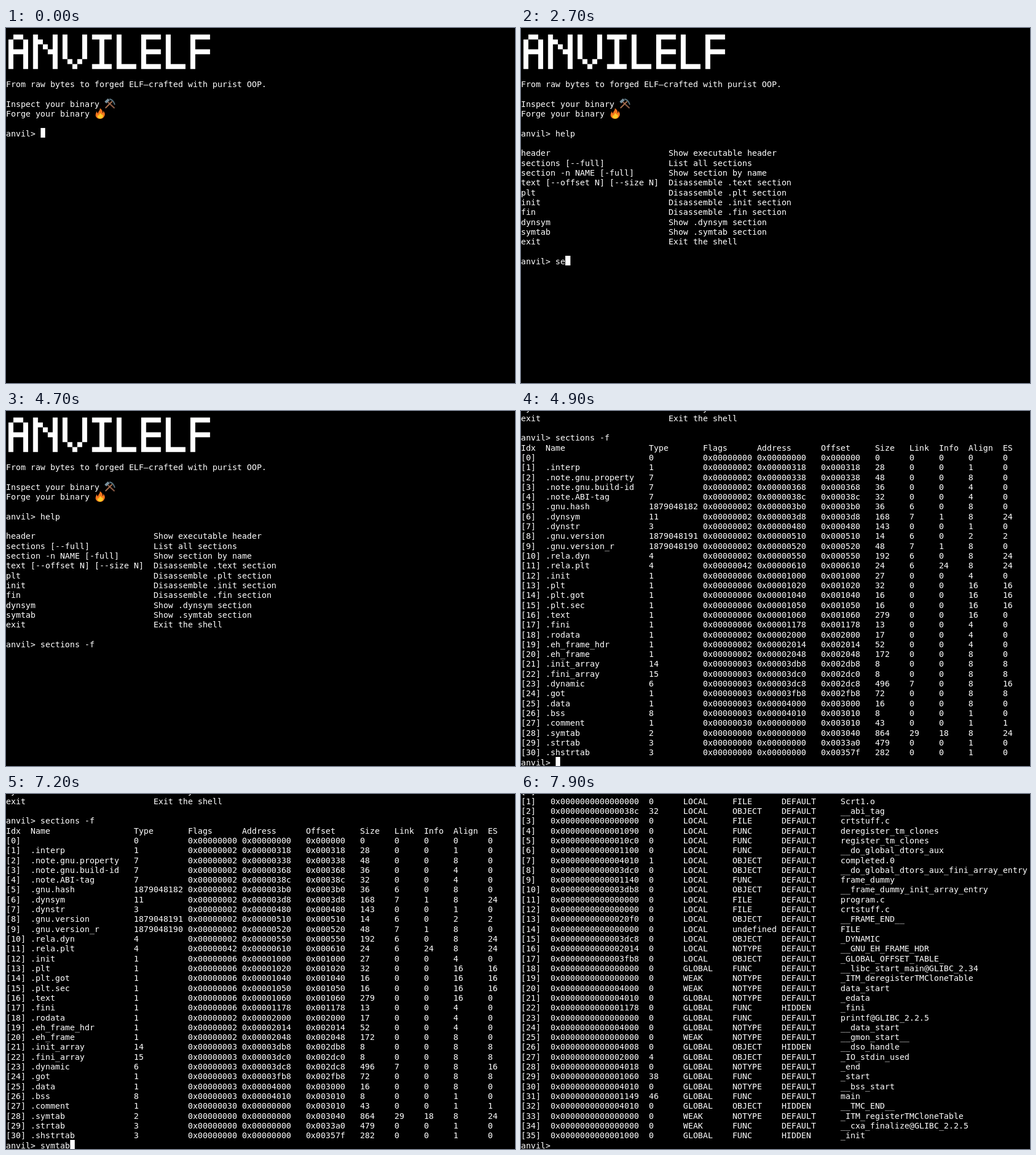
These frames come from a looping animation (896 by 625 pixels, 8000 ms). An HTML page with a canvas:

```html
<!DOCTYPE html>
<html lang="en">
<meta charset="utf-8">
<title>anvil shell</title>
<style>
  html, body { margin: 0; height: 100%; overflow: hidden; background: #000; }
  canvas { display: block; }
</style>
<canvas id="stage" width="896" height="625"></canvas>
<script>
const ctx = document.getElementById('stage').getContext('2d');
const LOOP = 8000, CELL = 8.655, LINE = 2 * CELL, TOP = 2.9, BASELINE = 14.8, ROWS = 36;
const PROMPT = 'anvil> ', IDLE = 500;

// Lay cells out at fixed text columns.
const layout = (columns, cells) =>
  cells.reduce((line, cell, i) => line.padEnd(columns[i]) + cell, '');
const parse = list => list.trimEnd().split(/,\s+/).map(row => row.split(' '));
const hex = (value, width) => '0x' + value.toString(16).padStart(width, '0');

const intro = ['', '', '', '', '',
  'From raw bytes to forged ELF—crafted with purist OOP.', '',
  'Inspect your binary', 'Forge your binary', ''];

const help = ['', ...[
  ['header', 'Show executable header'],
  ['sections [--full]', 'List all sections'],
  ['section -n NAME [-full]', 'Show section by name'],
  ['text [--offset N] [--size N]', 'Disassemble .text section'],
  ['plt', 'Disassemble .plt section'],
  ['init', 'Disassemble .init section'],
  ['fin', 'Disassemble .fin section'],
  ['dynsym', 'Show .dynsym section'],
  ['symtab', 'Show .symtab section'],
  ['exit', 'Exit the shell'],
].map(row => layout([0, 30], row)), ''];

// ELF section kinds: type, alignment, entry size, linked section
const kinds = {
  null: [0, 0, 0],
  bytes: [1, 1, 0], chars: [1, 1, 1], words: [1, 4, 0], longs: [1, 8, 0],
  code: [1, 16, 0], plt: [1, 16, 16], got: [1, 8, 8],
  symtab: [2, 8, 24, '.strtab'], strtab: [3, 1, 0], rela: [4, 8, 24, '.dynsym'],
  dynamic: [6, 8, 16, '.dynstr'], property: [7, 8, 0], note: [7, 4, 0], bss: [8, 1, 0],
  dynsym: [11, 8, 24, '.dynstr'], init: [14, 8, 8], fini: [15, 8, 8],
  hash: [0x6ffffff6, 8, 0, '.dynsym'], verneed: [0x6ffffffe, 8, 0, '.dynstr'],
  versym: [0x6fffffff, 2, 2, '.dynsym'],
};

// Segments: flags, start offset, then sections as name, size, kind, info
const segments = [
  [0, 0, ' 0 null'],
  [2, 0x318, `.interp 28 bytes, .note.gnu.property 48 property, .note.gnu.build-id 36 note,
    .note.ABI-tag 32 note, .gnu.hash 36 hash, .dynsym 168 dynsym 1, .dynstr 143 strtab,
    .gnu.version 14 versym, .gnu.version_r 48 verneed 1, .rela.dyn 192 rela, .rela.plt 24 rela .got`],
  [6, 0x1000, `.init 27 words, .plt 32 plt, .plt.got 16 plt, .plt.sec 16 plt, .text 279 code,
    .fini 13 words`],
  [2, 0x2000, '.rodata 17 words, .eh_frame_hdr 52 words, .eh_frame 172 longs'],
  [3, 0x2db8, `.init_array 8 init, .fini_array 8 fini, .dynamic 496 dynamic, .got 72 got,
    .data 16 longs, .bss 8 bss`],
  [0x30, 0x3010, '.comment 43 chars'],
  [0, 0x303b, '.symtab 864 symtab 18, .strtab 479 strtab, .shstrtab 282 strtab'],
];

const ALLOCATED = 2, WRITABLE = 1, INFO_LINK = 0x40;
const placed = segments.flatMap(([flags, start, list]) => {
  let end = start;
  return parse(list).map(([name, size, kind, info = '0']) => {
    const align = kinds[kind][1] || 1;
    const offset = Math.ceil(end / align) * align;
    if (kind !== 'bss') end = offset + Number(size);
    const address = flags & ALLOCATED ? offset + (flags & WRITABLE ? 0x1000 : 0) : 0;
    return { name, size, kind, info, offset, address,
      flags: info[0] === '.' ? flags | INFO_LINK : flags };
  });
});
const indexOf = name => placed.findIndex(section => section.name === name);

const sectionColumns = [0, 5, 26, 37, 48, 61, 72, 79, 85, 91, 98];
const sections = [
  ['Idx', 'Name', 'Type', 'Flags', 'Address', 'Offset', 'Size', 'Link', 'Info', 'Align', 'ES'],
  ...placed.map(({ name, size, kind, info, offset, address, flags }, i) => {
    const [type, align, entry, link = ''] = kinds[kind];
    return [`[${i}]`, name, type, hex(flags, 8), hex(address, 8), hex(offset, 6), size,
      indexOf(link), info[0] === '.' ? indexOf(info) : info, align, entry];
  }),
].map(cells => layout(sectionColumns, cells));

// Symbols: name, type, place as section+offset, size
const symbolList = parse(` NOTYPE, Scrt1.o FILE, __abi_tag OBJECT .note.ABI-tag 32, crtstuff.c FILE,
  deregister_tm_clones FUNC .text+30, register_tm_clones FUNC .text+60,
  __do_global_dtors_aux FUNC .text+a0, completed.0 OBJECT .bss 1,
  __do_global_dtors_aux_fini_array_entry OBJECT .fini_array, frame_dummy FUNC .text+e0,
  __frame_dummy_init_array_entry OBJECT .init_array, program.c FILE, crtstuff.c FILE,
  __FRAME_END__ OBJECT .eh_frame+a8,  FILE, _DYNAMIC OBJECT .dynamic,
  __GNU_EH_FRAME_HDR NOTYPE .eh_frame_hdr, _GLOBAL_OFFSET_TABLE_ OBJECT .got,
  __libc_start_main@GLIBC_2.34 FUNC, _ITM_deregisterTMCloneTable NOTYPE, data_start NOTYPE .data,
  _edata NOTYPE .bss, _fini FUNC .fini, printf@GLIBC_2.2.5 FUNC, __data_start NOTYPE .data,
  __gmon_start__ NOTYPE, __dso_handle OBJECT .data+8, _IO_stdin_used OBJECT .rodata 4,
  _end NOTYPE .bss+8, _start FUNC .text 38, __bss_start NOTYPE .bss, main FUNC .text+e9 46,
  __TMC_END__ OBJECT .bss, _ITM_registerTMCloneTable NOTYPE, __cxa_finalize@GLIBC_2.2.5 FUNC,
  _init FUNC .init`);
const WEAK = /^(_ITM_|data_start|__gmon|__cxa)/;
const HIDDEN = /^(_init|_fini|__dso_handle|__TMC_END__)$/;
const lastLocal = symbolList.findIndex(([name]) => name === '_GLOBAL_OFFSET_TABLE_');

const symbols = symbolList.map(([name, type, place = '', size = '0'], i) => {
  const [section, shift = '0'] = place.split('+');
  const value = placed[indexOf(section)].address + parseInt(shift, 16);
  const binding = i <= lastLocal ? 'LOCAL' : WEAK.test(name) ? 'WEAK' : 'GLOBAL';
  return layout([0, 6, 26, 33, 43, 53, 65], [`[${i}]`, hex(value, 16), size, binding, type,
    HIDDEN.test(name) ? 'HIDDEN' : 'DEFAULT', name]);
});

// Key times type one character each; other key presses only wake the cursor.
const sessions = [
  { output: intro, shown: -300, command: 'help', keys: [900, 1100, 1200, 1400], wakes: [1800] },
  { output: help, shown: 2000, command: 'sections -f', wakes: [],
    keys: [2600, 2700, 2900, 3100, 3100, 3400, 3600, 3700, 3800, 4100, 4200] },
  { output: sections, shown: 4900, command: 'symtab', wakes: [5700, 7200],
    keys: [5800, 6000, 6100, 6300, 6300, 6500] },
  { output: symbols, shown: 7400, command: '', keys: [], wakes: [] },
];
let log = [];
for (const session of sessions) {
  session.lines = [...log, ...session.output];
  log = [...session.lines, PROMPT + session.command];
}

// Banner letters as strokes one unit wide
const glyphs = {
  A: 'M1 .5h2M.5 1v6M3.5 1v6M1 3.5h2',
  N: 'M.5 0v7M4.5 0v7M1 1.5h1M2 2.5h1M3 3.5h1',
  V: 'M.5 0v5M4.5 0v5M1 5.5h1M2 6.5h1M3 5.5h1',
  I: 'M0 .5h4M2 .5v6M0 6.5h4',
  L: 'M.5 0v6.5h3.5',
  E: 'M4 .5H.5v6H4M.5 3.5H4',
  F: 'M4 .5H.5V7M.5 3.5H4',
};

function stroke(color, width, path) {
  ctx.strokeStyle = color;
  ctx.lineWidth = width;
  ctx.stroke(new Path2D(path));
}

function fill(color, path) {
  ctx.fillStyle = color;
  ctx.fill(new Path2D(path));
}

function at(x, y, paint) {
  ctx.save();
  ctx.translate(x, y);
  paint();
  ctx.restore();
}

function paintBanner() {
  ctx.scale(CELL, CELL);
  for (const letter of 'ANVILELF') {
    stroke('#fff', 1, glyphs[letter]);
    ctx.translate('NV'.includes(letter) ? 6 : 5, 0);
  }
}

function paintTools() {
  stroke('#8a5a44', 2.2, 'M-5 -4L8 8');
  stroke('#a8704f', 2.2, 'M4 -4L-8 8');
  stroke('#546e7a', 2.2, 'M-1 -8Q6 -7 8.5 2');
  stroke('#78909c', 4.4, 'M-8 -2L-2 -7.5');
}

function paintFire() {
  fill('#f4731c', 'M-1 -9C4 -7 4 -3 4 -1Q6 -2 5 -5C8 -2 9 2 7 5C4 11 -5 11 -8 5C-9 1 -7 -2 -6 -4Q-6 -1 -4 0C-4 -4 0 -5 -1 -9Z');
  fill('#ffca28', 'M0 -2C0 1 3 1 3 3Q4 2 4 1C6 5 4 9 0 9C-5 9 -6 5 -4 2Q-4 4 -2 4C-3 1 0 1 0 -2Z');
}

function drawLine(line, y) {
  [...line].forEach((char, column) => {
    if (char !== ' ') ctx.fillText(char, column * CELL, Math.round(y + BASELINE));
  });
}

function drawCursor(column, y) {
  const left = Math.round(column * CELL), top = Math.round(y);
  ctx.fillRect(left, top, Math.round((column + 1) * CELL) - left, Math.round(y + LINE) - top);
}

function draw(time) {
  const { lines: output, shown, command, keys, wakes } = sessions.findLast(s => s.shown <= time);
  const input = PROMPT + command.slice(0, keys.filter(key => key <= time).length);
  const lastActive = Math.max(...[shown, ...keys, ...wakes].filter(event => event <= time));
  const lines = [...output, input];
  const scroll = Math.max(0, lines.length - ROWS);
  const rowY = row => TOP + (row - scroll) * LINE;

  ctx.fillStyle = '#000';
  ctx.fillRect(0, 0, 896, 625);
  ctx.fillStyle = '#fff';
  ctx.font = '14.37px "DejaVu Sans Mono", monospace';
  lines.forEach((line, row) => {
    if (row >= scroll - 1) drawLine(line, rowY(row));
  });
  if (time - lastActive < IDLE) drawCursor(input.length, rowY(lines.length - 1));
  if (!scroll) {
    at(CELL / 2, rowY(0) + CELL, paintBanner);
    at(183, rowY(7) + 9, paintTools);
    at(166, rowY(8) + 9, paintFire);
  }
}

function tick() {
  draw(performance.now() % LOOP);
  requestAnimationFrame(tick);
}
tick();
</script>
</html>
```
